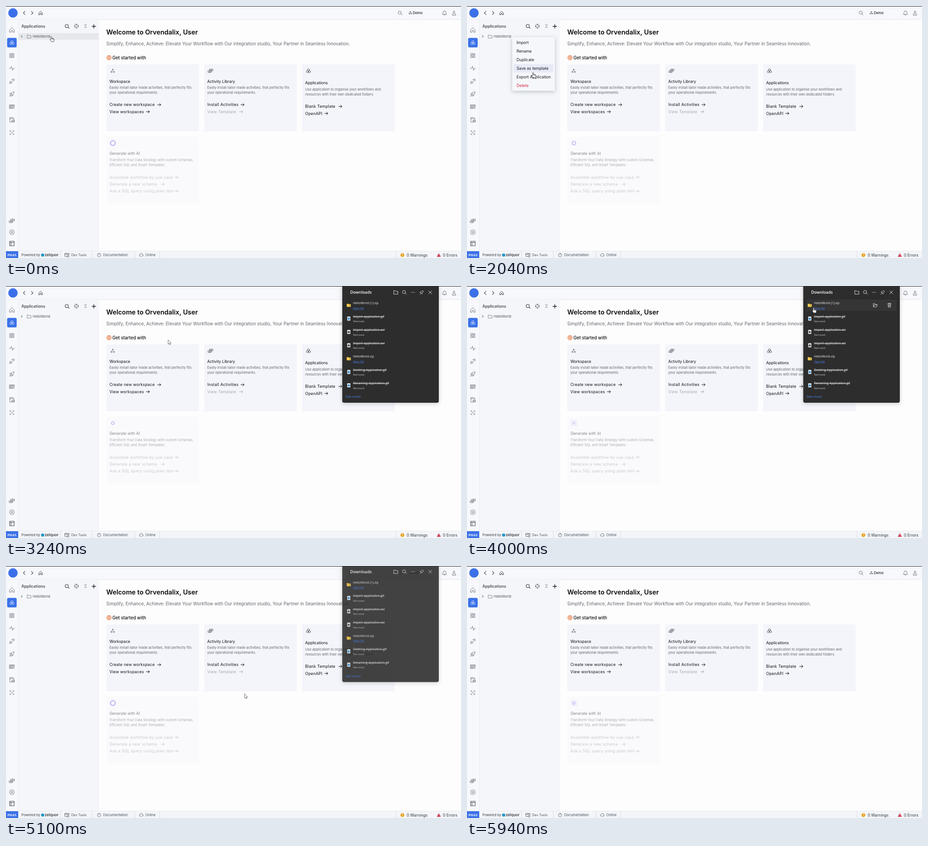
Animation of 1005 by 557 pixels, one loop 5.97 s. Source, as an HTML page with a canvas:

```html
<!DOCTYPE html>
<html lang="en">
<head>
<meta charset="utf-8">
<title>Integration studio</title>
<style>
html, body { margin: 0; width: 100%; height: 100%; overflow: hidden; background: #fdfdfd; }
canvas { display: block; width: 1005px; height: 557px; }
</style>
</head>
<body>
<canvas id="stage"></canvas>
<script>
const W = 1005, H = 557, LOOP = 5970, TAU = Math.PI * 2;
const canvas = document.getElementById('stage');
const ctx = canvas.getContext('2d');
const dpr = window.devicePixelRatio || 1;
canvas.width = Math.round(W * dpr);
canvas.height = Math.round(H * dpr);

const UI = 'Inter, sans-serif', SYSTEM = '"Open Sans", sans-serif';
const INK = '#0c0d10', GREY = '#686d76', LINE = '#e3e6ec', BLUE = '#3b71e8';

// Icon paths are centred on the origin.
const ICONS = {
  home: 'M-5 0L0-5 5 0V5H1.7V1H-1.7V5H-5Z',
  trefoil: 'M2.6-2.2A2.6 2.6 0 1 1-2.6-2.2 2.6 2.6 0 1 1 2.6-2.2M0 2A2.5 2.5 0 1 1-5 2 2.5 2.5 0 1 1 0 2M5 2A2.5 2.5 0 1 1 0 2 2.5 2.5 0 1 1 5 2',
  dots3: 'M1.4-2.6A1.4 1.4 0 1 1-1.4-2.6 1.4 1.4 0 1 1 1.4-2.6M-1.4 2.4A1.4 1.4 0 1 1-4.2 2.4 1.4 1.4 0 1 1-1.4 2.4M4.2 2.4A1.4 1.4 0 1 1 1.4 2.4 1.4 1.4 0 1 1 4.2 2.4',
  grid: 'M-4.5-4.5h3.5v3.5h-3.5ZM1-4.5h3.5v3.5H1ZM-4.5 1h3.5v3.5h-3.5ZM1 1h3.5v3.5H1Z',
  pulse: 'M-6 0h3L-1-4.5 1.5 4.5 3 0H6',
  plug: 'M-5.5 5.5L-3 3M-3.8 0L0 3.8-1.4 5Q-3 5.5-4.4 3.8T-3.8 0M0-3.8L3.8 0 5-1.4Q5.5-3 3.8-4.4T0-3.8M3.5-3.5L5.5-5.5M-2 1L-.6-.4M0 2.6L1.4 1.2',
  rocket: 'M-2 0Q0-5 5-5 5 0 0 2ZM-2 0L-5 .5-2.5-2.5H-.5M0 2L-.5 5 2.5 2.5V.5M-3 2L-5 5-2 3',
  table: 'M2 3.5H-5.5V-4.5H5.5V-1M-5.5-2H5.5M-5.5 1H2M-2-4.5V3.5M2-4.5V0M2 3L5.5 1M3 1L5 4',
  doc: 'M-.5 5H-4.5V-5H2L4.5-2.5V0M-4.5-2.5H4.5M.5 1H5.5V5H.5ZM.5 3H5.5',
  tools: 'M-4.5-4.5L4.5 4.5M-5-2L-2-5M2 5L5 2M4.5-4.5L1.5-1.5M-1.5 1.5L-4.5 4.5M2.5-5L5-2.5M-5 2.5L-2.5 5',
  blocks: 'M-5.5 0H1.5V3.8H-5.5ZM-2-3.8H5.5V0H-2ZM-2 0V3.8M1.7-3.8V0',
  layout: 'M-5-5H5V5H-5ZM-5-2.5H5M-2-2.5V5',
  search: 'M2.7-.8A3.5 3.5 0 1 1-4.3-.8 3.5 3.5 0 1 1 2.7-.8M1.7 1.7L4.5 4.5',
  target: 'M4.3 0A4.3 4.3 0 1 1-4.3 0 4.3 4.3 0 1 1 4.3 0M0-4.3V-1.8M0 1.8V4.3M-4.3 0H-1.8M1.8 0H4.3',
  collapse: 'M-2.5-4L0-1.5 2.5-4M-2.5 4L0 1.5 2.5 4',
  plus: 'M-4 0H4M0-4V4',
  left: 'M2-3.5L-1.7 0 2 3.5',
  right: 'M-2-3.5L1.7 0-2 3.5',
  arrow: 'M-3.7 0H3.5M.5-3L3.5 0 .5 3',
  folder: 'M-4.3 3.5V-3.5H-1L.3-2H4.3V3.5Z',
  openFolder: 'M-4 3.5V-3.5H-1L.2-2H3.2V-.5M-4 3.5L-2-.5H5L3.3 3.5Z',
  bell: 'M-4.5 2.7L-3.3 1V-1.4A3.3 3.3 0 0 1 3.3-1.4V1L4.5 2.7ZM-1.2 4.5H1.2',
  person: 'M2-2.4A2 2 0 1 1-2-2.4 2 2 0 1 1 2-2.4M-3.8 4.5V3.5Q-3.8 1.2-1.5 1.2H1.5Q3.8 1.2 3.8 3.5V4.5Z',
  screen: 'M-.5 3H-4.5V-3.7H4.5V-.5M-4.5-1.7H4.5M1 1H4.5V4H1Z',
  cloud: 'M-2.4 3A2.1 2.1 0 0 1-2.6-1 2.8 2.8 0 0 1 2.7-1 2 2 0 0 1 2.5 3M-1.3 3H1.2',
  pin: 'M-4.5 4.5L-1.3 1.3M-3.8-.5L.5 3.8 1.3 1 4.2-1.8 1.8-4.2-1-1.3Z',
  close: 'M-3.5-3.5L3.5 3.5M3.5-3.5L-3.5 3.5',
  trash: 'M-4-3H4M-1.4-3V-4.5H1.4V-3M-3-3L-2.4 4.5H2.4L3-3M-.9-.8V2.5M.9-.8V2.5'
};
const PATHS = Object.fromEntries(Object.entries(ICONS).map(([k, d]) => [k, new Path2D(d)]));
const HAND = new Path2D('M-1.2 1Q0-.7 1.1 1V4.3Q2.1 3.4 3 4.5 4 3.8 4.7 5 6 4.7 6.2 6V8.6Q6 10 5.2 11.7H.1Q-.5 10-3 7.4-3.4 5.8-1.2 7Z');
const FINGERS = new Path2D('M1.1 4V6.5M3 4.7V6.7M4.7 5.2V7');
const ARROW = new Path2D('M0 0V9.6L2.2 7.6 3.7 11 5.2 10.3 3.8 7H6.8Z');

function rect(x, y, w, h, fill, r = 0) {
  ctx.fillStyle = fill;
  ctx.beginPath();
  ctx.roundRect(x, y, w, h, r);
  ctx.fill();
}

function dot(x, y, r, fill) {
  ctx.fillStyle = fill;
  ctx.beginPath();
  ctx.arc(x, y, r, 0, TAU);
  ctx.fill();
}

function ring(x, y, r, color, width = 0.8) {
  ctx.strokeStyle = color;
  ctx.lineWidth = width;
  ctx.beginPath();
  ctx.arc(x, y, r, 0, TAU);
  ctx.stroke();
}

function icon(name, x, y, color = GREY, width = 0.9, scale = 1) {
  ctx.save();
  ctx.translate(x, y);
  ctx.scale(scale, scale);
  ctx.lineWidth = width / scale;
  ctx.lineJoin = ctx.lineCap = 'round';
  ctx.strokeStyle = color;
  ctx.stroke(PATHS[name]);
  ctx.restore();
}

// y is the middle of the capitals.
function text(str, x, y, size, color = INK, weight = 400, spacing = 0, family = UI) {
  ctx.font = `${weight} ${size}px ${family}`;
  ctx.letterSpacing = spacing + 'px';
  ctx.fillStyle = color;
  ctx.fillText(str, x, y + size * 0.36);
  return ctx.measureText(str).width;
}

const clamp = v => Math.max(0, Math.min(1, v));
const ease = v => v * v * (3 - 2 * v);

function drawTopBar() {
  rect(0, 0, W, 30, '#f6f8fb');
  rect(0, 29.5, W, 1, LINE);
  rect(0, 0, W, 1, '#1c1f24');
  dot(15.4, 15.3, 10.4, BLUE);
  icon('left', 40, 15.3, '#30343a', 1.1);
  icon('right', 58, 15.3, '#30343a', 1.1);
  icon('home', 76.5, 15.3, '#30343a', 0.9, 0.8);
  icon('search', 870.5, 15.5, GREY);
  icon('dots3', 893, 15.2, '#30343a', 0.9, 0.7);
  text('Demo', 898.5, 15.3, 7.7, '#23262b', 500);
  icon('bell', 968.5, 15.5, GREY);
  icon('person', 989.5, 15.5, GREY);
}

function drawRail() {
  rect(0, 30, 28, 511, '#f6f8fb');
  rect(27, 30, 1, 511, '#e9ecf1');
  rect(2.4, 70.4, 21.2, 21.2, BLUE, 3);
  icon('trefoil', 13, 81, '#fff', 0.8, 0.9);
  icon('home', 13, 53, GREY);
  ['grid', 'pulse', 'plug', 'rocket', 'table', 'doc', 'tools']
    .forEach((name, i) => icon(name, 13, 109.5 + i * 28.4, GREY));
  icon('blocks', 13, 475, '#555a63');
  ctx.strokeStyle = '#555a63';
  ctx.lineWidth = 0.9;
  ctx.beginPath();
  for (let i = 0; i <= 64; i++) {
    const a = i / 64 * TAU, r = 5.2 + 0.5 * Math.cos(a * 8);
    ctx.lineTo(13 + r * Math.cos(a), 500 + r * Math.sin(a));
  }
  ctx.stroke();
  ring(13, 500, 2, '#555a63', 0.9);
  icon('layout', 13, 525, '#454a52', 1.1);
}

function drawTree(hover) {
  rect(28, 30, 177.5, 511, '#f4f6f9');
  text('Applications', 34, 45, 8.7, '#4a4f58', 600);
  icon('search', 135, 45, '#30343a', 1.1);
  icon('target', 155.5, 44.5, '#4a4f58');
  icon('collapse', 175.5, 44.5, '#30343a', 0.9, 0.85);
  icon('plus', 194, 45, '#17191d', 1.3);
  if (hover) rect(28, 60, 177, 14.5, '#e6e8eb');
  icon('right', 35, 67.3, '#30343a', 1, 0.6);
  icon('folder', 51, 67.3, '#717780', 0.9, 0.95);
  text('HelloWorld', 59, 67.3, 7.5, '#4f545c');
}

function link(str, x, y, arrowX, color = INK) {
  text(str, x, y, 8.7, color, 400, 0.28);
  icon('arrow', arrowX, y, color, 1);
}

function card(x, glyph, title, titleY, lines) {
  rect(x, 129, 204.5, 148, '#f4f5fb');
  icon(glyph, x + 14, 143.3, '#30343a', 0.8, 0.95);
  text(title, x + 6.7, titleY, 8.6);
  lines.forEach((s, i) => text(s, x + 6.7, titleY + 14.3 + i * 11, 7.45, '#62666e'));
}

function drawSpark(t) {
  const phase = (t / 2550) % 1;
  const size = 0.5 + 0.5 * Math.cos(phase * TAU);
  const r = 1.6 + 3.7 * size;
  const color = `hsl(258 75% ${86 - 6 * size}%)`;
  if (size < 0.27) rect(229, 296, 14, 14, '#f1f0fb', 2);
  ctx.save();
  ctx.translate(236, 303);
  ctx.rotate(phase * TAU);
  for (let i = 0; i < 10; i++) {
    const a = i / 10 * TAU;
    ring(r * Math.cos(a), r * Math.sin(a), 0.3 + 1.1 * size, color, 0.7);
  }
  ring(0, 0, r, color, 0.8);
  ctx.restore();
}

function drawMain(t) {
  rect(205.5, 30, 799.5, 511, '#fdfdfd');
  text('Welcome to Orvendalix, User', 221.5, 57.8, 14.4, '#08090b', 600);
  text('Simplify, Enhance, Achieve: Elevate Your Workflow with Our integration studio, Your Partner in Seamless Innovation.',
    221.5, 83.5, 9.85, '#62666e');
  ring(227.5, 114.2, 4.7, '#e2682d', 1.3);
  ring(227.5, 114.2, 2.1, '#e2682d', 1.2);
  text('Get started with', 235, 114, 9.75, INK, 500);

  const tailor = ['Easily install tailor made activities, that perfectly fits', 'your operational requirements.'];
  card(221.7, 'dots3', 'Workspace', 166.5, tailor);
  link('Create new workspace', 228.4, 218.2, 338.5);
  link('View workspaces', 228.4, 233.7, 313.5);
  card(437.8, 'blocks', 'Activity Library', 166.5, tailor);
  link('Install Activities', 444.7, 218.2, 522.5);
  link('View Template', 444.7, 233.7, 519.5, '#a5a8af');
  card(654, 'trefoil', 'Applications', 170, ['Use application to organise your workflows and', 'resources with their own dedicated folders.']);
  link('Blank Template', 660.8, 222, 738.5);
  link('OpenAPI', 660.8, 237.4, 707.5);

  rect(221.7, 289, 204.5, 147.5, '#fafafd');
  drawSpark(t);
  text('Generate with AI', 228.4, 326.3, 8.6, '#85888e');
  text('Transform Your Data Strategy with custom Schemas,', 228.4, 340.8, 7.45, '#a9acb2');
  text('Efficient SQL and Smart Templates.', 228.4, 351.8, 7.45, '#a9acb2');
  link('Assemble workflow by use case', 228.4, 378.5, 376.5, '#c6c8cd');
  link('Generate a new schema', 228.4, 394, 346, '#c6c8cd');
  link('Ask a SQL query using plain text', 228.4, 409.3, 376.5, '#c6c8cd');
}

function drawFooter() {
  rect(0, 541, W, 16, '#f3f5f9');
  rect(0, 541, W, 0.7, '#e6e9ee');
  rect(0, 542, 27, 15, BLUE);
  text('IPAAS', 3, 550.3, 6.8, '#fff', 600);
  [120, 190, 284, 339, 861].forEach(x => rect(x, 542, 1, 15, '#dadde3'));
  text('Powered by', 34, 550.3, 7.4, '#3d4149');
  dot(81, 550.5, 3.6, '#2497c9');
  text('zelquor', 85.5, 550, 8.5, '#24272c', 500);
  icon('screen', 134.5, 550.5, '#555a63');
  text('Dev Tools', 144, 550.3, 7.3, '#4a4f58');
  ring(205.5, 550.5, 3.8, '#555a63');
  text('?', 203.9, 550.5, 5.5, '#555a63', 500);
  text('Documentation', 214.7, 550.3, 7.6, '#4a4f58');
  icon('cloud', 298.5, 550, '#555a63');
  text('Online', 307.8, 550.3, 7.5, '#4a4f58');
  dot(875.5, 550.6, 4.2, '#eba21a');
  rect(875.1, 548, 0.9, 3.2, '#fff');
  rect(875.1, 552, 0.9, 0.9, '#fff');
  text('0 Warnings', 885, 550.6, 8.6, '#30343a');
  ctx.fillStyle = '#c82540';
  ctx.fill(new Path2D('M956 546.5L960.4 554.3H951.6Z'));
  rect(955.6, 549.3, 0.9, 2.3, '#fff');
  rect(955.6, 552.3, 0.9, 0.8, '#fff');
  text('0 Errors', 965, 550.6, 8.5, '#30343a');
}

function floating(x, y, w, h, fill, r, blur, shade) {
  ctx.save();
  ctx.shadowColor = shade;
  ctx.shadowBlur = blur * dpr;
  ctx.shadowOffsetY = 2 * dpr;
  rect(x, y, w, h, fill, r);
  ctx.restore();
}

const MENU = ['Import', 'Rename', 'Duplicate', 'Save as template', 'Export Application', 'Delete'];

function drawMenu(pointer) {
  floating(100, 69, 94, 118.5, '#f5f7fb', 2, 9, 'rgba(40,50,70,.28)');
  const active = Math.floor((pointer.y - 71.3) / 19);
  MENU.forEach((label, i) => {
    const y = 81 + i * 18.95;
    if (i === active && pointer.x > 102) rect(103, y - 9.3, 88, 18.8, '#e7ebf6');
    text(label, 109.5, y, 8.75, label === 'Delete' ? '#d02546' : '#17191d');
  });
}

const FILES = ['HelloWorld (1).zip', 'Import-application.gif', 'Import-application.avi', 'Import-application.avi',
  'HelloWorld.zip', 'Deleting-Application.gif', 'Renaming-Application.gif'];
const PANEL = '#2d2d2d', PANEL_SHADE = 'rgba(0,0,0,.2)';

function fileIcon(kind, y) {
  if (kind === 'zip') {
    rect(752.7, y - 3.5, 4, 3, '#d99b20', 0.6);
    rect(752.7, y - 2.4, 8.8, 6.2, '#f5cf58', 0.7);
    rect(758.3, y - 2.4, 1.1, 6.2, '#b58724');
    return;
  }
  rect(753.7, y - 4.6, 6.8, 9.2, '#eceff2', 0.7);
  dot(757.1, y + 0.4, 2.3, kind === 'gif' ? '#2385cf' : '#45484d');
}

function drawDownloads(alpha, dy, hover) {
  ctx.save();
  ctx.globalAlpha = alpha;
  ctx.translate(0, dy);
  floating(742.7, -8, 213.3, 266, PANEL, 4, 10, PANEL_SHADE);
  text('Downloads', 760.3, 14.2, 8.9, '#fff', 600, 0, SYSTEM);
  icon('folder', 861, 14, '#eee', 0.9, 1.05);
  icon('search', 880, 14, '#eee');
  [-3.2, 0, 3.2].forEach(dx => dot(899 + dx, 14, 0.8, '#eee'));
  icon('pin', 918.3, 14, '#eee', 0.9, 0.95);
  icon('close', 937, 14, '#eee');
  if (hover) {
    rect(749, 30, 200, 25, '#353535', 2);
    icon('openFolder', 901.5, 42.3, '#ddd');
    icon('trash', 933, 42.3, '#ddd');
  }
  FILES.forEach((name, i) => {
    const y = 37.8 + i * 29.5, kind = name.slice(-3), kept = kind === 'zip';
    fileIcon(kind, y + 4.7);
    const w = text(name, 766.4, y, 6.85, '#f0f0f0', 400, 0, SYSTEM);
    if (!kept) rect(766.4, y + 0.3, w, 0.7, '#f0f0f0');
    const sub = text(kept ? 'Open file' : 'Removed', 766.4, y + 10.9, 5.7, kept ? '#4a83ee' : '#c4c4c4', 400, 0, SYSTEM);
    if (kept) rect(766.4, y + 14, sub, 0.6, '#4a83ee');
  });
  text('See more', 750, 244.5, 7.7, '#4a83ee', 400, 0, SYSTEM);
  ctx.restore();
}

// time, x, y of the pointer tip
const TRACK = [
  [0, 100, 67.3], [560, 100, 68.5], [1000, 127, 126.5], [1350, 130, 129],
  [1950, 145.7, 146.5], [2100, 146, 147], [2400, 153, 155], [2950, 153, 155],
  [3700, 765.5, 47.8], [4250, 765.5, 47.8], [4850, 527, 282.5], [5970, 527, 282.5]
];

function pointerAt(t) {
  const i = Math.max(1, TRACK.findIndex(k => k[0] > t));
  const [t0, x0, y0] = TRACK[i - 1], [t1, x1, y1] = TRACK[i];
  const p = ease(clamp((t - t0) / (t1 - t0)));
  return { x: x0 + (x1 - x0) * p, y: y0 + (y1 - y0) * p };
}

function drawPointer({ x, y }, hand) {
  ctx.save();
  ctx.translate(x, y);
  ctx.lineJoin = 'round';
  ctx.lineWidth = 0.8;
  ctx.fillStyle = '#fff';
  ctx.strokeStyle = hand ? '#26282c' : '#4c4f55';
  const shape = hand ? HAND : ARROW;
  ctx.fill(shape);
  ctx.stroke(shape);
  if (hand) ctx.stroke(FINGERS);
  ctx.restore();
}

function render(t) {
  ctx.setTransform(dpr, 0, 0, dpr, 0, 0);
  const pointer = pointerAt(t);
  const menuOpen = t >= 560 && t < 2480;
  drawMain(t);
  drawTopBar();
  drawRail();
  drawTree(t < 560);
  drawFooter();
  if (menuOpen) drawMenu(pointer);

  if (t >= 2760 && t < 2880) {
    ctx.globalAlpha = clamp((t - 2730) / 170);
    floating(721.5, -8, 208.5, 61, PANEL, 4, 8, PANEL_SHADE);
    ctx.globalAlpha = 1;
  }
  const overFile = pointer.x > 749 && pointer.x < 949 && pointer.y > 30 && pointer.y < 55;
  if (t >= 2880 && t < 5240) {
    const leaving = clamp((t - 5080) / 160);
    drawDownloads(1 - leaving, -leaving * 11, overFile);
  }
  const overLink = overFile && pointer.x < 791 && pointer.y > 44;
  if (t < 5500) drawPointer(pointer, t < 2480 || overLink);
}

function tick(now) {
  render(now % LOOP);
  requestAnimationFrame(tick);
}
requestAnimationFrame(tick);
</script>
</body>
</html>
```
